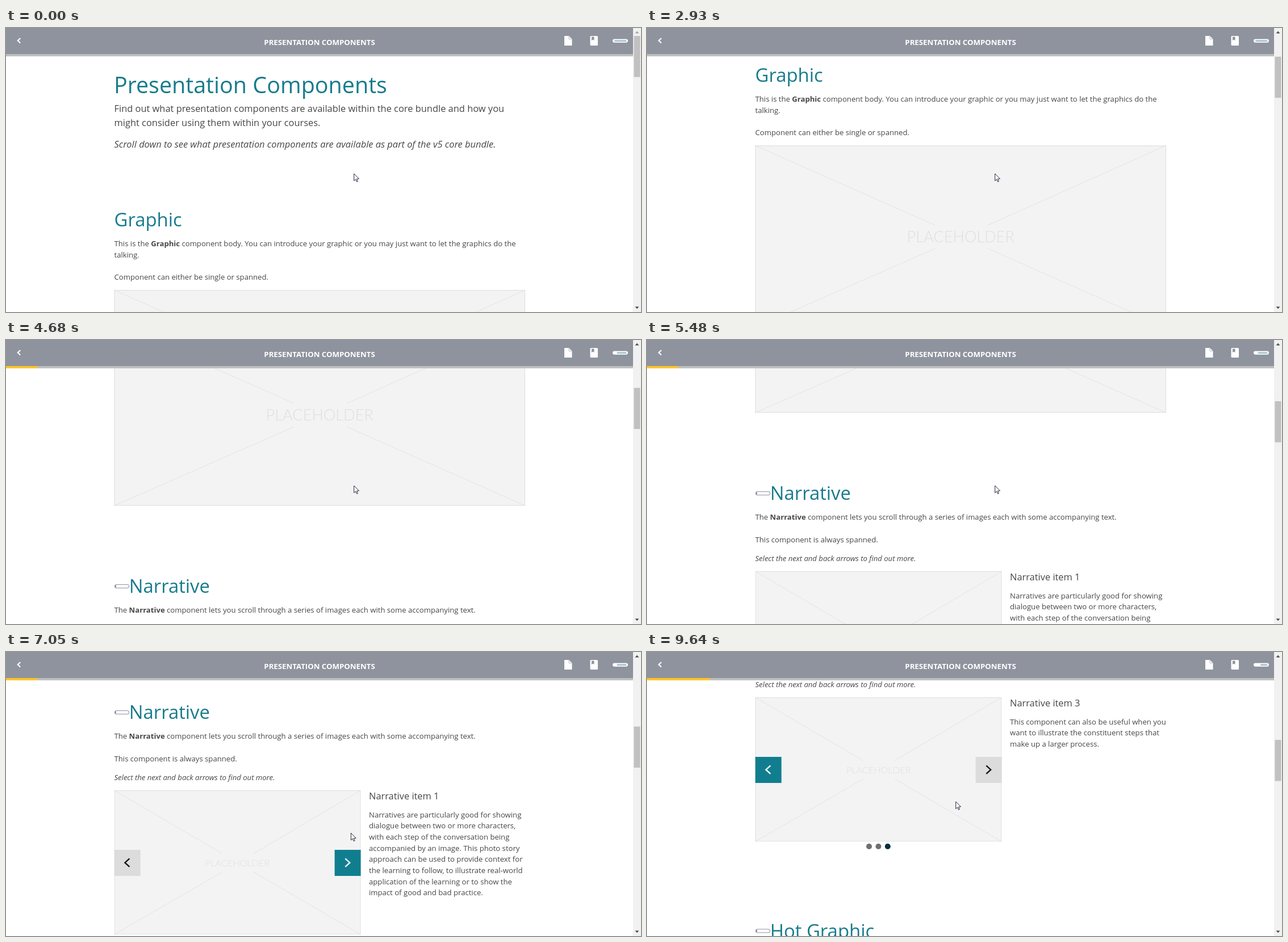
An HTML page with a canvas that plays this animation: 1118x501 px, repeating every 9720 ms.

```html
<!DOCTYPE html>
<html lang="en">
<head>
<meta charset="utf-8">
<title>Presentation Components</title>
<style>
  html, body { margin: 0; width: 100%; height: 100%; overflow: hidden; background: #fff; }
  canvas { display: block; }
</style>
</head>
<body>
<canvas id="stage" width="1118" height="501"></canvas>
<script>
const ctx = document.getElementById('stage').getContext('2d');
const LOOP = 9720;
const UNIT = 0.8192;               // page zoom
const TYPE = 0.8218;               // type zoom
const NOTCH = 100 * UNIT;          // one wheel notch
const LEFT = 190.5;
const TEAL = '#177b8c', TEXT = '#474747', GREY = '#8f939e', PALE = '#dcdcdc';

// Wheel notches: first visible step and how far the ease has got by then.
const notches = [
  [900, .35], [1480, .513], [2200, .35], [2930, .225], [3660, .35], [4520, .35],
  [5250, .35], [5320, .35], [5980, .35], [6470, .35], [9160, .35], [9260, .35]
];
const clicks = [7750, 7900];
const cursorPath = [
  [6910, 613, 257], [6980, 611, 272], [7130, 604, 372], [7210, 602, 398], [7320, 601, 364],
  [8650, 601, 364], [8730, 600, 357], [8850, 545, 265], [9560, 545, 265], [9640, 544, 264]
];

const items = [
  ['Narratives are particularly good for showing', 'dialogue between two or more characters,',
   'with each step of the conversation being', 'accompanied by an image. This photo story',
   'approach can be used to provide context for', 'the learning to follow, to illustrate real-world',
   'application of the learning or to show the', 'impact of good and bad practice.'],
  ['Each item has its own image, title and', 'body text to help tell the story.'],
  ['This component can also be useful when you', 'want to illustrate the constituent steps that',
   'make up a larger process.']
];

const clamp = v => Math.max(0, Math.min(1, v));
const swing = v => .5 - Math.cos(Math.PI * clamp(v)) / 2;

function scrollAt(t) {
  let pos = 0;
  for (const [start, phase] of notches) {
    if (t >= start) pos += NOTCH * swing(phase + .47 * Math.floor((t - start) / 70));
  }
  return Math.floor(pos);
}

function cursorAt(t) {
  const next = cursorPath.findIndex(p => p[0] > t);
  if (next === 0) return cursorPath[0].slice(1);
  if (next < 0) return cursorPath[cursorPath.length - 1].slice(1);
  const a = cursorPath[next - 1], b = cursorPath[next];
  const k = (t - a[0]) / (b[0] - a[0]);
  return [a[1] + (b[1] - a[1]) * k, a[2] + (b[2] - a[2]) * k];
}

function rect(x, y, w, h, color) {
  ctx.fillStyle = color;
  ctx.fillRect(x, y, w, h);
}

function path(points, close) {
  ctx.beginPath();
  points.forEach(([x, y]) => ctx.lineTo(x, y));
  if (close) ctx.closePath();
}

function stroke(color, width) {
  ctx.strokeStyle = color;
  ctx.lineWidth = width;
  ctx.stroke();
}

function fill(color) {
  ctx.fillStyle = color;
  ctx.fill();
}

// Parts between asterisks are bold.
function text(str, x, y, size, color = TEXT, style = '') {
  ctx.fillStyle = color;
  str.split('*').forEach((part, i) => {
    ctx.font = `${i % 2 ? 'bold' : style} ${size * TYPE}px "Open Sans", sans-serif`;
    ctx.fillText(part, x, Math.round(y));
    x += ctx.measureText(part).width;
  });
}

function pill(x, y, w, h, color) {
  ctx.beginPath();
  ctx.roundRect(x, y, w, h, h / 2);
  fill(color);
}

function chevron(x, y, w, h, dir, color, width) {
  path([[x - dir * w / 2, y - h / 2], [x + dir * w / 2, y], [x - dir * w / 2, y + h / 2]]);
  stroke(color, width);
}

function placeholder(x, y, w, h) {
  rect(x, y, w, h, '#f3f3f3');
  const near = .438, far = .566;
  for (const [ax, bx] of [[0, near], [1, far]]) {
    for (const [ay, by] of [[0, near], [1, far]]) {
      path([[x + ax * w, y + ay * h], [x + bx * w, y + by * h]]);
      stroke('#e3e3e3', 1);
    }
  }
  ctx.strokeStyle = '#dedede';
  ctx.strokeRect(x + .5, y + .5, w - 1, h - 1);
  ctx.font = `300 ${w * .0375}px Lato, sans-serif`;
  ctx.textAlign = 'center';
  ctx.fillStyle = '#dfdfdf';
  ctx.fillText('PLACEHOLDER', x + w / 2, y + h / 2 + w * .0146);
  ctx.textAlign = 'left';
}

function statusPill(y, progress) {
  pill(191, y - 3.5, 26, 7, GREY);
  pill(192, y - 2.5, 24, 5, '#fff');
  rect(192, y - 2, 2, 4, GREY);
  if (progress > 0) pill(191, y - 3.5, 8 + 18 * progress, 7, GREY);
}

function arrowButton(x, y, dir, enabled, hover) {
  rect(x, y, 46, 46, enabled ? (hover ? '#0d6b7b' : '#117e90') : PALE);
  chevron(x + 22.7, y + 22.7, 8, 14.5, dir, enabled ? '#fff' : '#111', 2.3);
}

function narrative(t, mouse, scroll) {
  statusPill(925.5, swing((t - 7890) / 300));
  text('Narrative', 216.7, 937.3, 40, TEAL);
  text('The *Narrative* component lets you scroll through a series of images each with some accompanying text.',
    LEFT, 972.4, 16);
  text('This component is always spanned.', LEFT, 1011.7, 16);
  text('Select the next and back arrows to find out more.', LEFT, 1044.7, 16, TEXT, 'italic');

  const w = 434, top = 1063, h = 254.5;
  const shift = clicks.reduce((sum, c) => sum + swing((t - c) / 350), 0);
  const index = clicks.filter(c => t >= c).length;
  ctx.save();
  ctx.beginPath();
  ctx.rect(LEFT, top, w, h);
  ctx.clip();
  items.forEach((_, i) => placeholder(LEFT + (i - shift) * w, top, w, h));
  ctx.restore();

  const hover = mouse[0] > 579 && mouse[1] + scroll > 1168 && mouse[1] + scroll < 1214;
  arrowButton(190.7, 1168, -1, index > 0, false);
  arrowButton(578.6, 1168, 1, index < 2, hover);

  text(`Narrative item ${index + 1}`, 639, 1079, 20);
  items[index].forEach((line, i) => text(line, 639, 1110.6 + i * 24 * UNIT, 16));
  for (let i = 0; i < 3; i++) {
    ctx.beginPath();
    ctx.arc(391 + i * 16.4, 1326, 5, 0, 7);
    fill(i === index ? '#082f3d' : '#6f6f6f');
  }
}

function page(t, mouse, scroll) {
  ctx.save();
  ctx.translate(0, -scroll);
  text('Presentation Components', LEFT - .6, 114.5, 48, TEAL);
  text('Find out what presentation components are available within the core bundle and how you', LEFT, 148.3, 20);
  text('might consider using them within your courses.', LEFT, 172.9, 20);
  text('Scroll down to see what presentation components are available as part of the v5 core bundle.',
    LEFT, 210.5, 20, TEXT, 'italic');

  text('Graphic', LEFT, 350.3, 40, TEAL);
  text('This is the *Graphic* component body. You can introduce your graphic or you may just want to let the graphics do the',
    LEFT, 385.4, 16);
  text('talking.', LEFT, 405, 16);
  text('Component can either be single or spanned.', LEFT, 444.4, 16);
  placeholder(LEFT, 462.3, 723.5, 321);

  narrative(t, mouse, scroll);
  statusPill(1475, 0);
  text('Hot Graphic', 216.7, 1486.5, 40, TEAL);
  ctx.restore();
}

function header(t) {
  rect(0, 0, 1104, 46, GREY);
  rect(0, 46, 1104, 4, '#bfbfbf');
  const done = 55 * swing((t - 3054) / 1000) + 56 * swing((t - 7890) / 1000);
  rect(0, 46, done, 4, '#ffc627');
  chevron(23, 22.3, 4.5, 8.5, -1, '#fff', 2.1);
  ctx.textAlign = 'center';
  text('PRESENTATION COMPONENTS', 552, 30, 16.1, '#fff', 'bold');
  ctx.textAlign = 'left';

  path([[983, 14], [991, 14], [996.5, 19.5], [996.5, 31], [983, 31]], true);
  fill('#fff');
  path([[991, 14.5], [991, 19.5], [996, 19.5]]);
  stroke('#b9bcc4', 1);
  ctx.beginPath();
  ctx.roundRect(1028.5, 14, 13.5, 17, 1.5);
  fill('#fff');
  path([[1031, 15.5], [1035.5, 15.5], [1035.5, 22], [1033.2, 20.5], [1031, 22]], true);
  fill(GREY);

  pill(1068, 19.5, 27, 6.2, '#fff');
  const inner = 1071 + done * .08;
  pill(inner, 21.5, 1092.5 - inner, 2.4, '#9dbccb');
}

function triangle(y, dir, color) {
  path([[1107.5, y + 2 * dir], [1114.5, y + 2 * dir], [1111, y - 2 * dir]], true);
  fill(color);
}

function scrollbar(scroll) {
  rect(1104, 0, 14, 501, '#f1f1f1');
  rect(1105.5, 14 + scroll * .1435, 11, 72.5, '#c1c1c1');
  triangle(7.5, 1, scroll > 0 ? '#505050' : '#a3a3a3');
  triangle(493.5, -1, '#505050');
}

function cursor([x, y]) {
  path([[0, 0], [0, 12.6], [2.9, 9.9], [4.8, 14.3], [6.7, 13.5], [4.9, 9.2], [8.8, 9]]
    .map(([dx, dy]) => [x - .3 + dx, y + dy]), true);
  fill('#fff');
  stroke('#23233a', 1);
}

function draw() {
  const t = performance.now() % LOOP;
  const scroll = scrollAt(t), mouse = cursorAt(t);
  rect(0, 0, 1118, 501, '#fff');
  page(t, mouse, scroll);
  header(t);
  scrollbar(scroll);
  cursor(mouse);
  requestAnimationFrame(draw);
}
draw();
</script>
</body>
</html>
```
